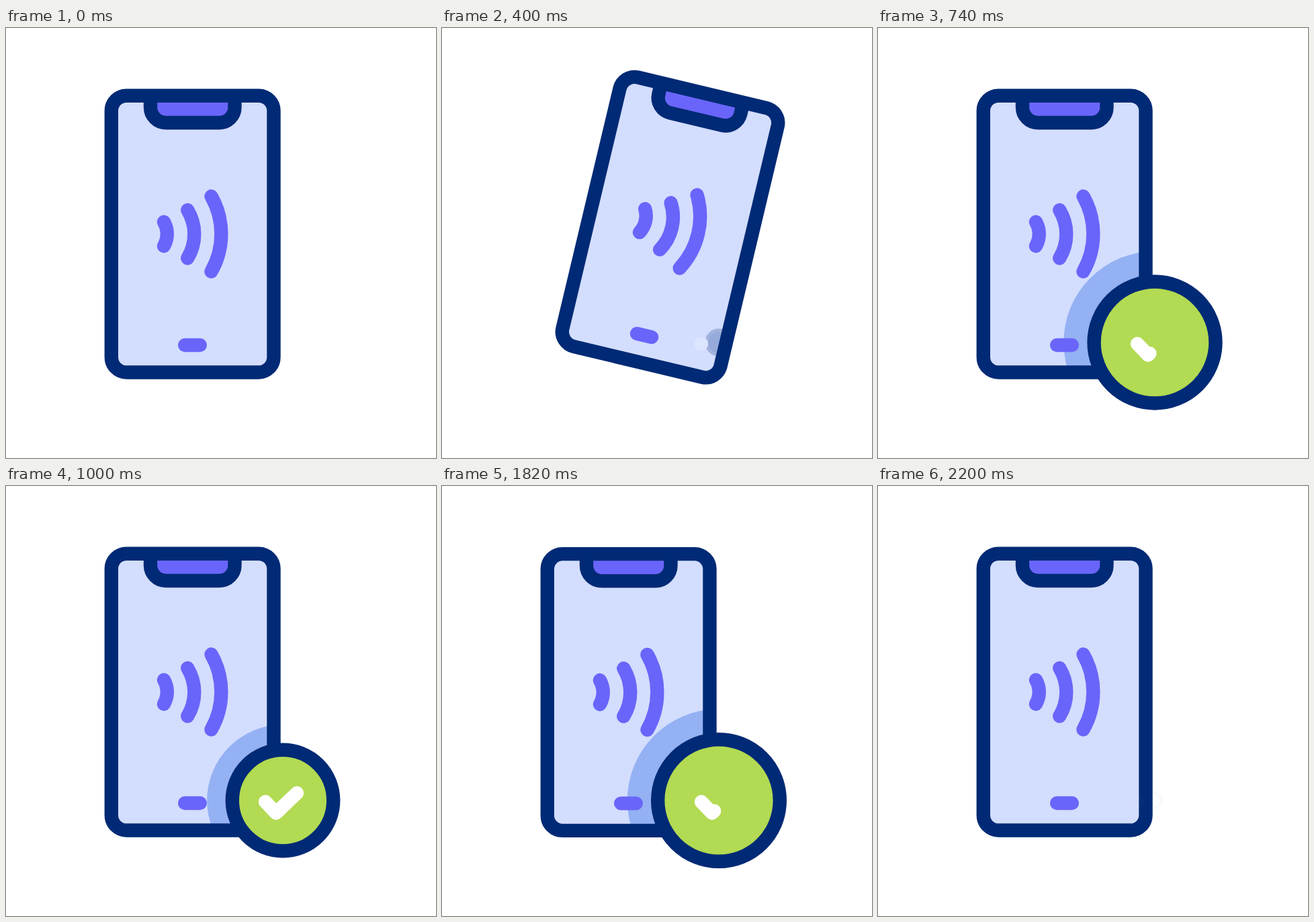
These frames come from a looping animation (640 px wide and 640 px high, 2400 ms). An HTML page:

```html
<!DOCTYPE html>
<html lang="en">
<head>
<meta charset="utf-8">
<title>Contactless payment</title>
<style>
  html, body { margin: 0; width: 100%; height: 100%; overflow: hidden; background: #fff; }
  svg { display: block; width: 100%; height: 100%; }
  .line { fill: none; stroke-width: 20.4; stroke-linecap: round; stroke-linejoin: round; }
  .navy { stroke: #002a75; }
  .violet { stroke: #6a65fa; }
</style>
</head>
<body>
<svg viewBox="0 0 640 640">
  <defs>
    <clipPath id="screen">
      <rect class="pose" x="156.8" y="100.7" width="241.7" height="411.8" rx="22.5"/>
    </clipPath>
  </defs>
  <rect class="pose" x="156.8" y="100.7" width="241.7" height="411.8" rx="22.5" fill="#d3ddfe"/>
  <g clip-path="url(#screen)">
    <circle id="halo" cx="412" cy="468" fill="#94b1f3"/>
  </g>
  <g class="pose">
    <path class="line violet" d="M235 288.7A35.8 35.8 0 0 1 235 324.5M270.3 271A69 69 0 0 1 270.3 342.5M305.5 250.5A113 113 0 0 1 305.5 362.5M266.2 472H288.8"/>
    <path class="line navy" style="fill:#6a65fa;stroke-linecap:butt" d="M215 101V118A23 23 0 0 0 238 141H317.5A23 23 0 0 0 340.5 118V101"/>
    <rect class="line navy" x="156.8" y="100.7" width="241.7" height="411.8" rx="22.5"/>
  </g>
  <g id="badge">
    <circle id="disc" class="line navy" cx="412" cy="468" style="fill:#b2da52"/>
    <path id="tick" class="line" stroke="#fff" pathLength="100" d="M386 470L402 486.7L433 457"/>
  </g>
</svg>
<script>
  const LOOP = 2400, RADIUS = 75.2;
  const byId = id => document.getElementById(id);
  const poses = document.querySelectorAll('.pose');
  const [halo, badge, disc, tick] = ['halo', 'badge', 'disc', 'tick'].map(byId);

  const progress = (t, from, to) => Math.min(1, Math.max(0, (t - from) / (to - from)));
  const smooth = u => (1 - Math.cos(Math.PI * u)) / 2;

  function bezier(x1, y1, x2, y2) {
    const at = (s, a, b) => 3 * (1 - s) ** 2 * s * a + 3 * (1 - s) * s * s * b + s ** 3;
    return u => {
      if (u <= 0 || u >= 1) return u;
      let lo = 0, hi = 1;
      for (let i = 0; i < 30; i++) {
        const mid = (lo + hi) / 2;
        if (at(mid, x1, x2) < u) lo = mid; else hi = mid;
      }
      return at(lo, y1, y2);
    };
  }
  const grow = bezier(.587, 1, .445, 1.57);
  const shrink = bezier(.555, -.72, .413, 0);

  // Eased track through [time, value] stops
  function track(t, stops) {
    let value = stops[0][1];
    for (let i = 1; i < stops.length; i++) {
      const [t0, v0] = stops[i - 1], [t1, v1] = stops[i];
      if (t >= t0) value = v0 + (v1 - v0) * smooth(progress(t, t0, t1));
    }
    return value;
  }

  const tilt = t => track(t, [[0, 0], [60, -.6], [334, 15.4], [620, 0]]);
  const bob = t => track(t, [[1500, 0], [1820, .4], [1960, -1.2], [2200, 0]]);

  function draw(t) {
    const pose = `translate(0 ${bob(t)}) rotate(${tilt(t)} 351 565)`;
    poses.forEach(el => el.setAttribute('transform', pose));

    const size = t < 1250 ? grow(progress(t, 350, 1000)) : 1 - shrink(progress(t, 1495, 2215));
    const r = Math.max(0, RADIUS * size);
    disc.setAttribute('r', r);
    halo.setAttribute('r', r * 1.5);

    const alpha = progress(t, 350, 568) - progress(t, 2000, 2204);
    badge.setAttribute('opacity', alpha);
    halo.setAttribute('opacity', alpha);

    const shown = smooth(progress(t, 540, 1000)) - smooth(progress(t, 1500, 2080));
    tick.setAttribute('stroke-dasharray', `${Math.max(0, shown) * 100} 300`);
  }

  const start = performance.now();
  function frame() {
    // The last pose holds until the loop restarts
    draw(Math.min(2200, (performance.now() - start) % LOOP));
    requestAnimationFrame(frame);
  }
  frame();
</script>
</body>
</html>
```
